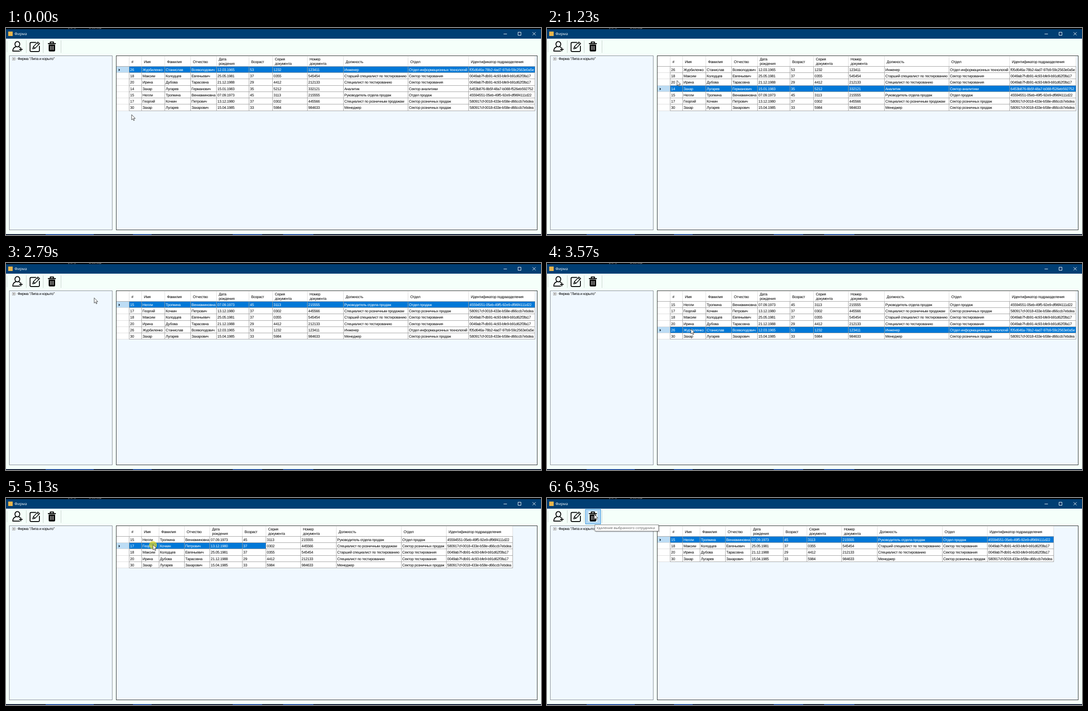
Write an HTML page that moves like this. It is 1201 by 466 pixels and loops after 6940 ms.

```html
<!DOCTYPE html>
<html lang="ru">
<head>
<meta charset="utf-8">
<title>Фирма</title>
<style>
html, body { margin: 0; width: 100%; height: 100%; overflow: hidden; background: #f5fffa; }
svg { display: block; width: 100%; height: 100%; }
text { font: 8.4px "Liberation Sans", Arial, sans-serif; letter-spacing: -.36px; white-space: pre; text-rendering: geometricPrecision; }
.ui { font-family: "Open Sans", "Noto Sans", sans-serif; letter-spacing: 0; }
</style>
</head>
<body>
<svg id="stage" viewBox="0 0 1201 466" preserveAspectRatio="none">
  <defs>
    <clipPath id="narrowClip"><rect x="248" y="63" width="890" height="391"/></clipPath>
    <clipPath id="wideClip"><rect x="248" y="63" width="940" height="391"/></clipPath>
    <clipPath id="headLeft"><rect x="248" y="63" width="640" height="25"/></clipPath>
    <clipPath id="headRight"><rect x="888" y="63" width="250" height="25"/></clipPath>
  </defs>
  <g id="window"></g>
  <g id="hover">
    <rect x="86.5" y="25.5" width="34" height="33" fill="#b3d7f3" stroke="#2b8fdd"/>
    <rect x="93" y="30" width="20" height="23" fill="#f5fffa"/>
  </g>
  <g id="icons" fill="none" stroke="#000" stroke-width="1.9" stroke-linecap="round" stroke-linejoin="round">
    <ellipse cx="25.5" cy="36.5" rx="5.4" ry="6"/>
    <path d="M21.5 42.5C17 44 15.3 47 15.2 52H30.5M29.5 42.8L31.5 43.8M33.3 45V51.5M30 48.2H36.6"/>
    <path d="M67 32.5H56.5Q54 32.5 54 35V50.5Q54 53 56.5 53H72.5Q75 53 75 50.5V41"/>
    <path d="M60 47L61.5 42L71.5 31.5L75.5 35.2L65 45.7ZM69.5 33.5L73.4 37.3M61.5 42L65 45.7" stroke-width="1.6"/>
    <path d="M95 35.2H111M99.5 34V31.5H106.5V34" stroke-width="2.2"/>
    <path d="M96.5 38H109.5V50.5Q109.5 52 108 52H98Q96.5 52 96.5 50.5Z" fill="#000" stroke-width="1.4"/>
    <path d="M99.8 40.5V49M103 40.5V49M106.2 40.5V49" stroke="#fff" stroke-width="1.1"/>
  </g>
  <g id="tree">
    <rect x="14.5" y="66.5" width="6" height="6" fill="#fff" stroke="#919191" stroke-width=".8"/>
    <path d="M15.7 69.5H19.3M17.5 67.7V71.3" stroke="#333" stroke-width=".8"/>
    <path d="M21.5 69.5H25" stroke="#999" stroke-width=".8" stroke-dasharray="1 1"/>
    <text x="26" y="72.2">Фирма "Липа и корыто"</text>
  </g>
  <g id="grid"></g>
  <g id="tooltip">
    <rect x="109" y="62" width="144" height="15" fill="#000" opacity=".18"/>
    <rect x="107.5" y="60.5" width="143" height="14" fill="#fff" stroke="#767676"/>
    <text class="ui" x="111" y="70.3" fill="#575757" style="font-size:7.85px">Удаление выбранного сотрудника</text>
  </g>
  <circle id="click" r="9" fill="#e8d820" opacity=".7"/>
  <path id="cursor" d="M0 0V11.8L2.7 9.3L4.6 13.5L6.3 12.7L4.5 8.6H8.2Z" fill="#fff" stroke="#111" stroke-width=".8"/>
</svg>
<script>
const $ = id => document.getElementById(id);
const LOOP = 6940, TOP = 87, ROW = 14.22;

const WIDE = [276, 304, 356, 414, 472, 545, 598, 676, 757, 902, 1038, 1187];
const NARROW = [276, 304, 343, 400, 457, 530, 583, 661, 741, 887, 988, 1137];
const HEADERS = ["#", "Имя", "Фамилия", "Отчество", "Дата|рождения", "Возраст", "Серия|документа",
  "Номер|документа", "Должность", "Отдел", "Идентификатор подраазделения"];
const TESTING = "Сектор тестирования|0049ab7f-db91-4c93-bfe9-b91d62f3fa17";
const RETAIL = "Сектор розничных продаж|580917cf-0018-433e-b58e-d66ccb7ebdea";
const STAFF = Object.fromEntries([
  "26|Журбиленко|Станислав|Всеволодович|12.03.1965|53|1232|123411|Инженер|Отдел информационных технологий|f05d646a-78b2-4ad7-97b9-59c2563e0a5e",
  "18|Максим|Колодцев|Евгеньевич|25.05.1981|37|0355|545454|Старший специалист по тестированию|" + TESTING,
  "20|Ирина|Дубова|Тарасовна|21.12.1988|29|4412|212133|Специалист по тестированию|" + TESTING,
  "14|Захар|Лугарев|Германович|15.01.1983|35|5212|332121|Аналитик|Сектор аналитики|6453b876-8b5f-48a7-b088-f526eb592752",
  "15|Нелли|Тропкина|Вениаминовна|07.09.1973|45|3113|215555|Руководитель отдела продаж|Отдел продаж|45594551-05eb-49f5-92e9-df96f4111d22",
  "17|Георгий|Кочкин|Петрович|13.12.1980|37|0302|445566|Специалист по розничным продажам|" + RETAIL,
  "30|Захар|Лугарев|Захарович|15.04.1985|33|5984|984633|Менеджер|" + RETAIL
].map(line => [line.slice(0, 2), line.split("|")]));

const rect = (x, y, w, h, fill) => `<rect x="${x}" y="${y}" width="${w}" height="${h}" fill="${fill}"/>`;
const path = (d, stroke, width = 1) => `<path d="${d}" fill="none" stroke="${stroke}" stroke-width="${width}"/>`;
const label = (x, y, s, fill = "#000") => `<text x="${x}" y="${y}" fill="${fill}">${s}</text>`;
const frame = (x, y, w, h, stroke) =>
  `<rect x="${x}" y="${y}" width="${w}" height="${h}" fill="#f0f8ff" stroke="${stroke}"/>`;

function drawWindow() {
  const taskbar = [[89, 108], [285, 42], [509, 66], [622, 68]];
  $("window").innerHTML =
    rect(0, 0, 1201, 466, "#f5fffa") + rect(0, 0, 1201, 3, "#000") +
    label(139, 1, "(x64)", "#ccc") + label(186, 1, "Desktop", "#ccc") +
    rect(0, 2.5, 1201, 21.5, "#003e73") + rect(5, 8, 10, 10, "#e9b44c") +
    `<text class="ui" x="19" y="16.3" fill="#fff" style="font-size:8.4px">Фирма</text>` +
    path("M1117 13.5H1124.5M1149.5 9.5H1156V16.5H1149.5ZM1182 9.5L1189 16.5M1189 9.5L1182 16.5", "#fff") +
    `<path d="M2.5 30V55" stroke="#b5bdba" stroke-dasharray="1.4 1.4"/>` +
    path("M45.5 28V56M83.5 28V56M123.5 28V56", "#c8cfcc") +
    frame(7.5, 62.5, 231, 392, "#828790") + frame(247.5, 62.5, 945, 392, "#222") +
    rect(0, 464, 1201, 2, "#07142e") +
    taskbar.map(([x, w]) => rect(x, 464, w, 2, "#1b479a")).join("");
}

function drawHeader(cols) {
  let out = rect(248, 63, cols[11] - 248, 24, "#fff");
  cols.forEach((x, i) => {
    out += path(`M${x + .5} 64V87`, "#dcdcdc");
    const lines = (HEADERS[i] || "").split("|");
    lines.forEach((s, k) => {
      out += label(x + 5.5, lines.length > 1 ? 73.4 + k * 9.2 : 78.7, s);
    });
  });
  return out + path(`M248 86.5H${cols[11] + 1}`, "#a0a0a0");
}

function drawRows(cols, ids, selected, selectedTo) {
  let out = "";
  ids.forEach((id, r) => {
    const y = Math.round(TOP + r * ROW), bottom = Math.round(TOP + (r + 1) * ROW);
    const active = r === selected;
    out += rect(248, y, cols[11] - 248, bottom - y, "#fff");
    if (active) {
      out += rect(248, y, 28, bottom - y, "#bcdcf4") + rect(277, y, selectedTo - 277, bottom - y, "#0078d7") +
        `<path d="M253 ${y + 4.4}l3 2.9l-3 2.9z" fill="#123"/>`;
    }
    STAFF[id].forEach((s, c) => {
      out += label(cols[c] + 2.6, y + 9.9, s, active && cols[c] < selectedTo ? "#fff" : "#000");
    });
    out += path(`M248 ${bottom - .5}H276`, "#dcdcdc") +
      path(`M276 ${bottom - .5}H${cols[11] + 1}`, "#a0a0a0");
  });
  const end = Math.round(TOP + ids.length * ROW);
  return out + path(cols.map(x => `M${x + .5} ${TOP}V${end}`).join(""), "#a0a0a0");
}

function drawGrid({ cols, ids, sel, selTo = cols[11], stale }) {
  const clip = (name, body) => `<g clip-path="url(#${name})">${body}</g>`;
  const head = stale
    ? clip("headLeft", drawHeader(NARROW)) + clip("headRight", drawHeader(WIDE))
    : drawHeader(cols);
  const rows = drawRows(cols, ids.split(" "), sel, selTo);
  $("grid").innerHTML = clip(stale ? "narrowClip" : "wideClip", head + rows);
}

// Each state lasts until the next one starts.
const STATES = [
  { at: 0, cols: WIDE, ids: "26 18 20 14 15 17 30", sel: 0 },
  { at: 930, cols: WIDE, ids: "26 18 20 14 15 17 30", sel: 3 },
  { at: 2010, cols: WIDE, ids: "26 18 20 14 15 17", sel: 3, busy: true },
  { at: 2180, cols: WIDE, ids: "15 17 18 20 26 30", sel: 0 },
  { at: 3260, cols: WIDE, ids: "15 17 18 20 26 30", sel: 4 },
  { at: 4500, cols: WIDE, ids: "15 17 18 20 26", sel: 4, busy: true, stale: true },
  { at: 4670, cols: NARROW, ids: "15 17 18 20 30", sel: 0 },
  { at: 5130, cols: NARROW, ids: "15 17 18 20 30", sel: 1, selTo: 583 },
  { at: 5280, cols: NARROW, ids: "15 17 18 20 30", sel: 1 },
  { at: 6230, cols: NARROW, ids: "15 17 18 20", sel: 1, busy: true },
  { at: 6390, cols: NARROW, ids: "15 18 20 30", sel: 0 }
];

// Cursor route: time, x, y.
const ROUTE = [
  [0, 282, 195], [760, 336.5, 136], [930, 331, 134], [1080, 322, 130], [1700, 117, 50], [2010, 116, 51],
  [2180, 129, 57], [2330, 140, 60], [2790, 198, 78.5], [3110, 316, 144], [3260, 318, 146], [3420, 323, 148],
  [4190, 118, 45], [4500, 118, 42.5], [4670, 124, 47], [5130, 330, 105], [5280, 329, 105],
  [5910, 112, 42], [6230, 106, 38], [6390, 106, 36.5], [LOOP, 106, 36.5]
];
const CLICKS = [930, 1850, 3260, 4340, 5130, 6070];

// The screen refreshes about every 156 ms between these moments.
const MARKS = [0, 140, 760, 930, 1080, 1230, 2010, 2180, 2330, 2790, 2960, 3110, 3260, 3420,
  4500, 4670, 5130, 5280, 5450, 5600, 6390];
const TICKS = MARKS.flatMap((a, i) => {
  const b = MARKS[i + 1] || a;
  const n = Math.max(1, Math.round((b - a) / 156));
  return Array.from({ length: n }, (_, k) => Math.floor(a + (b - a) * k / n));
});

function cursorAt(t) {
  const i = ROUTE.findIndex(p => p[0] > t);
  const [t0, x0, y0] = ROUTE[i - 1], [t1, x1, y1] = ROUTE[i];
  const u = (t - t0) / (t1 - t0), e = u * u * (3 - 2 * u);
  return [x0 + (x1 - x0) * e, y0 + (y1 - y0) * e];
}

const show = (id, on) => $(id).style.display = on ? "" : "none";
let lastTick = -1, lastState = null;

function render(time) {
  const t = time % LOOP;
  const tick = TICKS.findLast(s => s <= t);
  if (tick === lastTick) return;
  lastTick = tick;

  const state = STATES.findLast(s => s.at <= tick);
  if (state !== lastState) drawGrid(lastState = state);

  const [x, y] = cursorAt(tick);
  $("cursor").setAttribute("transform", `translate(${x} ${y})`);
  $("click").setAttribute("cx", x);
  $("click").setAttribute("cy", y + 1);
  show("click", CLICKS.some(c => Math.abs(c - tick) < 20));
  show("hover", x > 86 && x < 121 && y < 59);
  show("tree", !state.busy);
  show("tooltip", tick >= 6390);
}

drawWindow();
const start = performance.now();
function loop() {
  render(performance.now() - start);
  requestAnimationFrame(loop);
}
loop();
</script>
</body>
</html>
```
